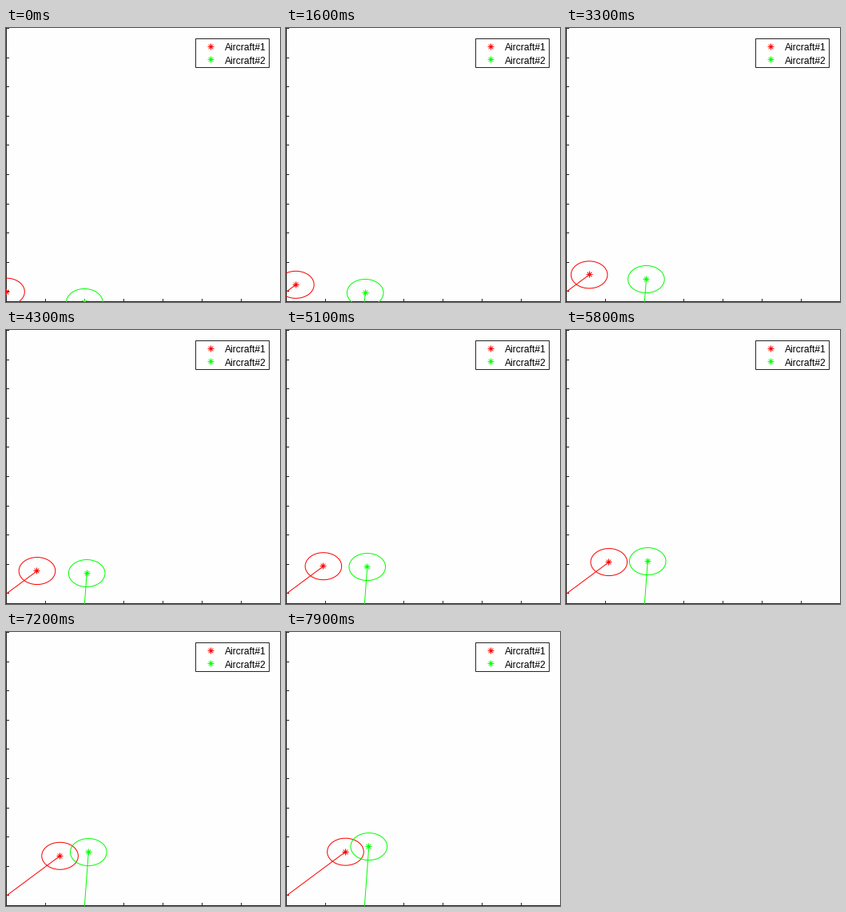
A matplotlib script for the animation above (8 s loop, 343 by 343 pixels).

```python
import numpy as np
import matplotlib.pyplot as plt
from matplotlib.animation import FuncAnimation
from matplotlib.patches import Rectangle

SIZE = 343
DPI = 72            # one point equals one pixel
RX, RY = 22.8, 17.0
INK = "#262626"
HOLD = 4            # frames before the aircraft start moving

plt.rcParams["path.simplify"] = False
fig = plt.figure(figsize=((SIZE + 0.01) / DPI,) * 2, dpi=DPI)
fig.patch.set_facecolor("#fefefe")
ax = fig.add_axes([0, 0, 1, 1])
ax.set_xlim(0, SIZE)
ax.set_ylim(SIZE, 0)
ax.axis("off")


def line(xs, ys, color, z):
    return ax.plot(xs, ys, color=color, lw=1, zorder=z, snap=False,
                   solid_capstyle="butt")[0]


def star(x, y):
    """Eight-armed asterisk centred on the pixel that holds (x, y)."""
    cx, cy = np.floor(x) + 0.5, np.floor(y) + 0.5
    a, d, gap = 4, 2.8, np.nan
    xs = np.array([-a, a, gap, 0, 0, gap, -d, d, gap, -d, d])
    ys = np.array([0, 0, gap, -a, a, gap, -d, d, gap, d, -d])
    return cx + xs, cy + ys


class Aircraft:
    angle = np.linspace(0, 2 * np.pi, 121)

    def __init__(self, start, step, color):
        self.start, self.step = np.array(start), np.array(step)
        self.trail = line([], [], color, 3)
        self.zone = line([], [], color, 3)
        self.mark = line([], [], color, 4)

    def move(self, k):
        x, y = self.start + k * self.step
        self.trail.set_data([self.start[0], x], [self.start[1], y])
        self.zone.set_data(x + RX * np.cos(self.angle),
                           y + RY * np.sin(self.angle))
        self.mark.set_data(*star(x, y))


# axes with inward ticks
line([0.5, 0.5], [0, SIZE], INK, 2)
line([0, SIZE], [342.5, 342.5], INK, 2)
for n in range(10):
    y = np.floor(0.5 + 36.6 * n) + 0.5
    line([0, 4], [y, y], INK, 2)
for n in range(1, 7):
    x = 49 * n + 0.5
    line([x, x], [339, SIZE], INK, 2)

# legend
ax.add_patch(Rectangle((237.5, 13.5), 92, 36, fc="white", ec=INK, lw=1,
                       zorder=5, snap=False))
for name, color, y, base in (("Aircraft#1", "#ff0000", 23.5, 28),
                             ("Aircraft#2", "#00ff00", 39.5, 45)):
    line(*star(256.5, y), color, 6)
    ax.text(274, base, name, family="Liberation Sans", size=12,
            color="black", va="baseline", zorder=6)

planes = [Aircraft((0.5, 330.15), (0.986, -0.733), "#ff0000"),
          Aircraft((98.3, 343.45), (0.073, -0.998), "#00ff00")]


def draw(i):
    for plane in planes:
        plane.move(max(0, i - HOLD))
    return []


anim = FuncAnimation(fig, draw, frames=80, interval=100, repeat=True,
                     repeat_delay=0, blit=False)
plt.show()
```
